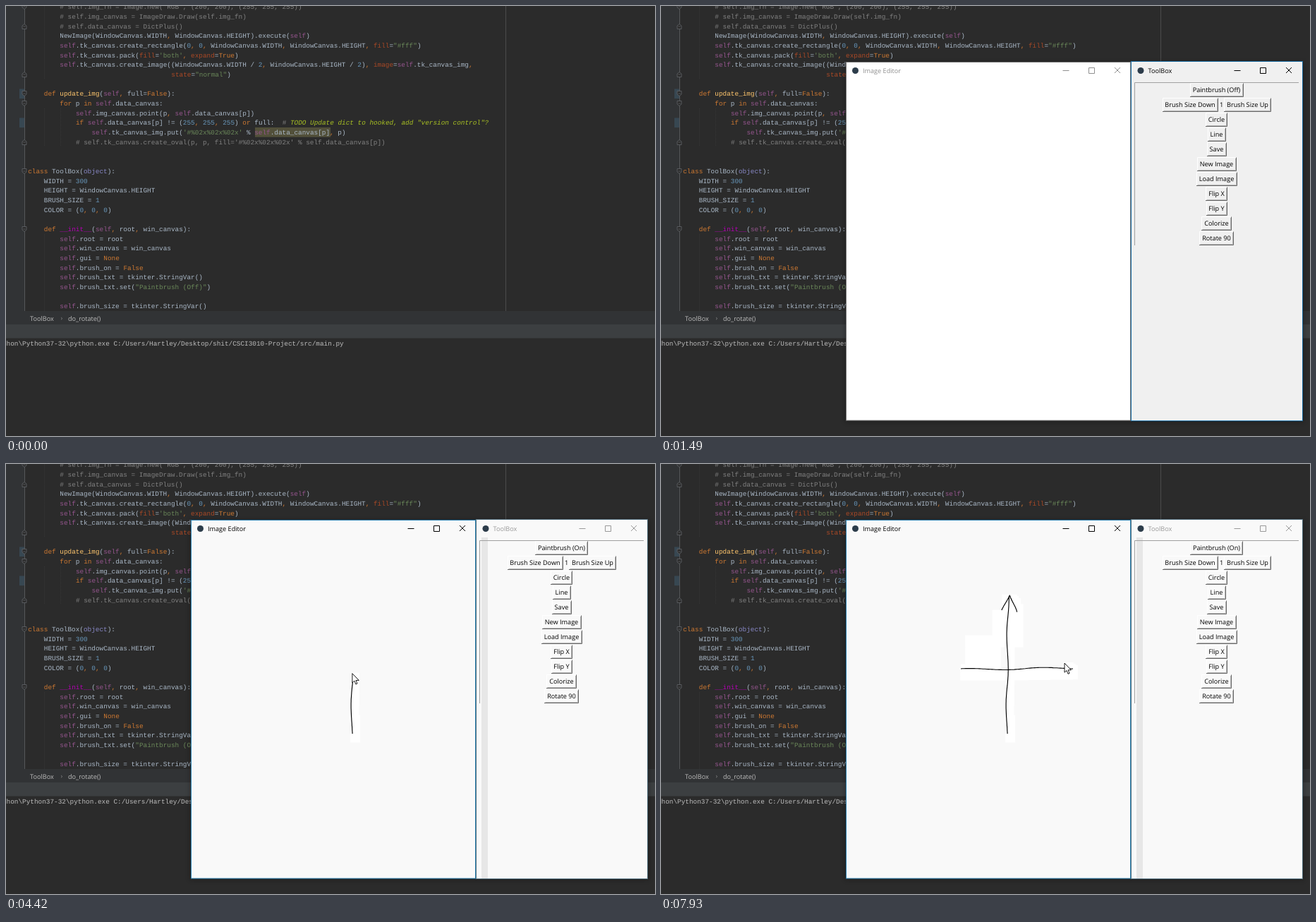
Animation, 920 px wide and 609 px high, one loop 8 s. Source, as an HTML page:

```html
<!DOCTYPE html>
<html lang="en">
<head>
<meta charset="utf-8">
<title>Image editor demo</title>
<style>
html, body { margin: 0; width: 100%; height: 100%; overflow: hidden; background: #2b2b2b; }
svg { display: block; width: 920px; height: 609px; }
text { text-rendering: geometricPrecision; white-space: pre; }
.code { font: 9.4px "Liberation Mono", "Courier New", monospace; fill: #a9b7c6; }
.ui { font: 9.15px "Open Sans", "Noto Sans", sans-serif; }
.mid { text-anchor: middle; }
</style>
</head>
<body>
<svg id="stage" viewBox="0 0 920 609" xmlns="http://www.w3.org/2000/svg"></svg>
<script>
const LOOP = 8000;
const stage = document.getElementById('stage');
const $ = id => document.getElementById(id);
const rect = (x, y, w, h, fill, more = '') =>
  `<rect x="${x}" y="${y}" width="${w}" height="${h}" fill="${fill}" ${more}/>`;
const path = (d, stroke, more = '') => `<path d="${d}" fill="none" stroke="${stroke}" ${more}/>`;
const label = (x, y, s, fill, more = 'class="ui"') => `<text x="${x}" y="${y}" fill="${fill}" ${more}>${s}</text>`;

// ---------- code editor ----------
const CHAR = 5.643, ROW = 13.68;
const source = `
        # self.img_fn = Image.new("RGB", (200, 200), (255, 255, 255))
        # self.img_canvas = ImageDraw.Draw(self.img_fn)
        # self.data_canvas = DictPlus()
        NewImage(WindowCanvas.WIDTH, WindowCanvas.HEIGHT).execute(self)
        self.tk_canvas.create_rectangle(0, 0, WindowCanvas.WIDTH, WindowCanvas.HEIGHT, fill="#fff")
        self.tk_canvas.pack(fill='both', expand=True)
        self.tk_canvas.create_image((WindowCanvas.WIDTH / 2, WindowCanvas.HEIGHT / 2), image=self.tk_canvas_img,
                                    state="normal")

    def update_img(self, full=False):
        for p in self.data_canvas:
            self.img_canvas.point(p, self.data_canvas[p])
            if self.data_canvas[p] != (255, 255, 255) or full:  # TODO Update dict to hooked, add "version control"?
                self.tk_canvas_img.put('#%02x%02x%02x' % self.data_canvas[p], p)
            # self.tk_canvas.create_oval(p, p, fill='#%02x%02x%02x' % self.data_canvas[p])


class ToolBox(object):
    WIDTH = 300
    HEIGHT = WindowCanvas.HEIGHT
    BRUSH_SIZE = 1
    COLOR = (0, 0, 0)

    def __init__(self, root, win_canvas):
        self.root = root
        self.win_canvas = win_canvas
        self.gui = None
        self.brush_on = False
        self.brush_txt = tkinter.StringVar()
        self.brush_txt.set("Paintbrush (Off)")

        self.brush_size = tkinter.StringVar()`.split('\n').slice(1);

const RULES = [
  [/"[^"]*"|'[^']*'/, '#6a8759'],
  [/# (?=TODO)/, '#808080'],
  [/TODO.*/, '#a8c023', 'font-style="italic"'],
  [/#.*/, '#808080'],
  [/\bself\b/, '#94558d'],
  [/__init__/, '#b200b2'],
  [/(?<=def )\w+/, '#ffc66d'],
  [/\b(?:def|class|for|in|if|or|None|True|False)\b|,/, '#cc7832'],
  [/\b(?:fill|expand|image|state)(?==)/, '#aa4926'],
  [/\bobject\b/, '#8888c6'],
  [/\b\d+\b/, '#6897bb']
];
const lexer = new RegExp(RULES.map(r => `(${r[0].source})`).join('|'), 'g');
const paint = s => s.replace(lexer, (m, ...g) => {
  const rule = RULES[g.findIndex(v => v !== undefined)];
  return `<tspan fill="${rule[1]}" ${rule[2] || ''}>${m}</tspan>`;
});
const rowY = i => 1.3 + i * ROW;
const codeLine = (s, i) => {
  const body = s.trimStart(), x = 31.2 + (s.length - body.length) * CHAR;
  return `<text class="code" x="${x}" y="${rowY(i) + 3}">${paint(body)}</text>`;
};
const fold = (row, dir) => `<g transform="translate(26 ${Math.round(rowY(row))}) scale(1 ${dir})">
  <path d="M-3-3.5V1L0 3.5L3 1V-3.5ZM-1.5 0H1.5" fill="#2b2b2b" stroke="#63666a" stroke-width=".8"/></g>`;

const editorBack = rect(0, 0, 920, 609, '#2b2b2b')
  + rect(0, 0, 26, 432, '#313335')
  + [9, 12].map(i => rect(19, rowY(i) - 7, 7, ROW, '#374752')).join('')
  + path('M26.5 0V432', '#555759')
  + path('M54.5 0V103M54.5 145V199M77.5 145V199M54.5 323V432', '#363636', 'stroke-dasharray="1 1"')
  + path('M708.5 0V432', '#4b4b4b')
  + [0, 9, 10, 17, 23].map(i => fold(i, 1)).join('')
  + [2, 7, 14].map(i => fold(i, -1)).join('')
  + rect(353, 172, 107, 13.6, '#52503a')
  + source.map(codeLine).join('')
  + rect(0, 432, 920, 19, '#313335') + rect(0, 451, 920, 19.5, '#3c3f41')
  + label(34, 445.5, 'ToolBox', '#bbb') + label(77.5, 445, '›', '#888') + label(88, 445.5, 'do_rotate()', '#bbb')
  + label(.5, 481, 'hon\\Python37-32\\python.exe C:/Users/Hartley/Desktop/shit/CSCI3010-Project/src/main.py', '#bbb', 'class="code" style="fill:#bbb"');

// ---------- windows ----------
const controls = right => path(
  `M${right - 97} 91.5h9M${right - 60} 87.5h8v8h-8zM${right - 23.5} 87l8 8m0-8l-8 8`, 'currentColor');
const titleBar = (left, right, s) => `<circle cx="${left}" cy="91.5" r="4.5" fill="#2c3c4a"/>`
  + label(left + 10.5, 94.7, s, 'currentColor') + controls(right);

const pen = document.createElement('canvas').getContext('2d');
pen.font = '9.15px "Open Sans", "Noto Sans", sans-serif';

function button(cx, y, s, id = '') {
  const w = Math.round(pen.measureText(s).width) + 8;
  const l = Math.round(cx - w / 2), r = l + w;
  return `<g ${id && `id="${id}"`}>`
    + path(`M${l + .5} ${y + 9}V${y - 9.5}H${r}`, '#fff')
    + path(`M${r - 1.5} ${y - 8}V${y + 8.5}H${l + 1.5}`, '#a8a8a8', 'stroke-width=".8"')
    + path(`M${r - .5} ${y - 9.5}V${y + 9.5}H${l}`, '#696969')
    + label(cx, y + 3.3, s, '#000', 'class="ui mid"') + '</g>';
}

const MID = 787.5;
const column = ['Circle', 'Line', 'Save', 'New Image', 'Load Image', 'Flip X', 'Flip Y', 'Colorize', 'Rotate 90'];
const toolbox = `<g id="toolbox">`
  + rect(666.5, 78.5, 243, 509, '#f0f0f0', 'id="toolBg"')
  + rect(674, 104, 9, 483, '#e7e7e7', 'id="strip"')
  + `<g id="toolBar">${titleBar(680, 909.5, 'ToolBox')}</g>`
  + path('M671.5 339V108.5H904', '#a0a0a0')
  + button(MID, 119, 'Paintbrush (Off)', 'brushOff') + button(MID, 119, 'Paintbrush (On)', 'brushOn')
  + button(750, 140, 'Brush Size Down') + label(794.5, 143.3, '1', '#000', 'class="ui mid"')
  + button(831.5, 140, 'Brush Size Up')
  + column.map((s, i) => button(MID, Math.round(161 + i * 20.94), s)).join('') + '</g>';

const canvasWin = `<g id="canvasWin">`
  + rect(262.5, 79.5, 403, 507.5, '#fff', 'id="canvasBg"')
  + '<path id="repaint" fill="#fff"/>'
  + `<g id="canvasBar">${titleBar(275.5, 666.5, 'Image Editor')}</g>`
  + path('', '#000', 'id="ink" stroke-width="1.15"') + '</g>';

stage.innerHTML = '<defs><filter id="blur" x="-5%" y="-5%" width="110%" height="110%"><feGaussianBlur stdDeviation="3.5"/></filter></defs>'
  + editorBack
  + rect(261, 80, 650, 509, '#000', 'id="shadow" filter="url(#blur)" opacity=".3"')
  + canvasWin + toolbox
  + '<path id="pointer" d="M0 0V13.2L3 10.5L5 15.3L7.1 14.4L5.1 9.8H9.4Z" fill="#fff" stroke="#000" stroke-width=".9"/>';

// ---------- motion ----------
const OPEN = 1220, STEP = 131.3;      // the screen refreshes once per step
const POINTER = 1610, BRUSH = 2960, ACTIVE = 3800;

// pointer: time, x, y
const moves = [
  [1610, 770, 183], [1770, 682, 114], [2190, 637, 207], [2700, 788, 97], [3210, 783, 116],
  [3600, 529, 337], [4000, 490, 381], [4860, 492, 186], [5530, 484, 208], [5690, 493, 185],
  [5950, 497, 191], [6230, 504, 209], [6490, 428, 290], [6770, 426, 291], [7430, 583, 289],
  [7900, 572, 282]
];
const penDown = [[4000, 4860], [5530, 6230], [6770, 7430]];

const clamp = v => Math.max(0, Math.min(1, v));
const show = (id, on) => $(id).setAttribute('display', on ? 'inline' : 'none');
const set = (id, key, v) => $(id).setAttribute(key, v);

function pointerAt(t) {
  const i = moves.findIndex(m => m[0] > t);
  if (i < 0) return moves[moves.length - 1].slice(1);
  const a = moves[Math.max(0, i - 1)], b = moves[i];
  const k = clamp((t - a[0]) / (b[0] - a[0]));
  return [a[1] + (b[1] - a[1]) * k, a[2] + (b[2] - a[2]) * k];
}

// the line follows the pointer with a slight tremble of the hand
function inkUntil(now) {
  let d = '';
  for (const [from, to] of penDown) {
    for (let t = from; t <= Math.min(now, to); t += 10) {
      const [x, y] = pointerAt(t), shake = 1.3 * Math.sin((t - 6925) / 70);
      d += `${t === from ? 'M' : 'L'}${(x + shake).toFixed(1)} ${(y + shake).toFixed(1)}`;
    }
  }
  return d;
}

// every refresh clears the box the pointer has just crossed
function repaintUntil(now) {
  let d = '';
  for (let t = OPEN + 22 * STEP; t <= now; t += STEP) {
    const [x, y] = pointerAt(t), [u, v] = pointerAt(t - STEP);
    d += `M${Math.min(x, u) - 2} ${Math.min(y, v) - 1}H${Math.max(x, u) + 10}V${Math.max(y, v) + 16}H${Math.min(x, u) - 2}Z`;
  }
  return d;
}

function pose(id, cx, rest, shrink, fade) {
  const k = clamp(rest) ** 2.5;
  set(id, 'transform', `translate(${cx} 333) scale(${1 - shrink * k}) translate(${-cx} -333)`);
  set(id, 'opacity', 1 - fade * k);
}

function draw(time) {
  const n = Math.floor((time - OPEN) / STEP + .001), t = OPEN + n * STEP + 1;
  const active = t >= ACTIVE, on = t >= BRUSH;

  for (const id of ['canvasWin', 'toolbox', 'shadow']) show(id, n >= 0);
  pose('canvasWin', 464, 1 - n / 2, .031, .61);
  pose('toolbox', 788, 1 - n, .012, .27);

  set('canvasBg', 'fill', active ? '#f9f9f9' : '#fff');
  set('canvasBg', 'stroke', active ? '#2a7fae' : '#777');
  set('toolBg', 'fill', active ? '#f9f9f9' : '#f0f0f0');
  set('toolBg', 'stroke', active ? '#53707f' : '#1d6fa5');
  set('canvasBar', 'color', active ? '#000' : '#8f8f8f');
  set('toolBar', 'color', active ? '#999' : '#000');
  show('strip', active);
  show('brushOn', on);
  show('brushOff', !on);

  show('pointer', t >= POINTER);
  set('pointer', 'transform', `translate(${pointerAt(t)})`);
  set('repaint', 'd', repaintUntil(t));
  set('ink', 'd', inkUntil(t));
}

const begin = performance.now();
function frame() {
  draw((performance.now() - begin) % LOOP);
  requestAnimationFrame(frame);
}
frame();
</script>
</body>
</html>
```
